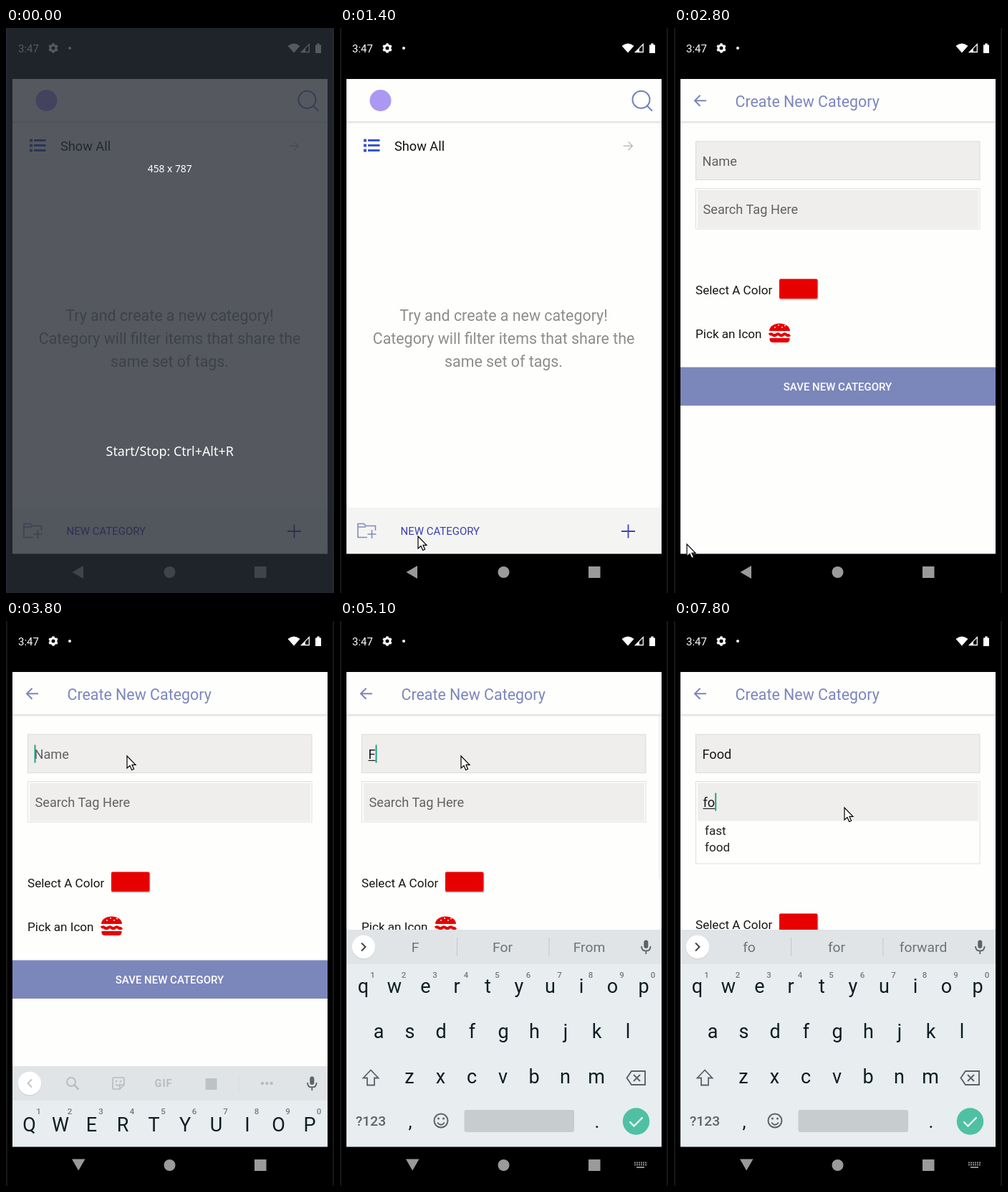
These frames come from a looping animation (458 px wide and 787 px high, 8 s). An HTML page:

```html
<!DOCTYPE html>
<html lang="en">
<head>
<meta charset="utf-8">
<title>Create a category</title>
<style>
  html, body { margin: 0; width: 100%; height: 100%; overflow: hidden; background: #000; }
  svg { display: block; width: 458px; height: 787px; }
  text { font-family: Roboto, Arial, sans-serif; white-space: pre; }
</style>
</head>
<body>
<svg id="stage" viewBox="0 0 458 787"></svg>
<script>
const LOOP = 8000, STEP = 100, TOP = 71, HEIGHT = 661;
const WHITE = '#fefefd', BLUE = '#7b86bb', RED = '#e60000', GREY = '#5c6266', INK = '#0d1d24';

// Markup helpers
const text = (x, y, size, str, fill, attrs = '') =>
  `<text x="${x}" y="${y}" font-size="${size}" fill="${fill}" ${attrs}>${str}</text>`;
const mid = (x, y, size, str, fill, attrs = '') =>
  text(x, y, size, str, fill, `text-anchor="middle" ${attrs}`);
const rect = (x, y, w, h, fill, attrs = '') =>
  `<rect x="${x}" y="${y}" width="${w}" height="${h}" fill="${fill}" ${attrs}/>`;
const disc = (x, y, r, fill, attrs = '') =>
  `<circle cx="${x}" cy="${y}" r="${r}" fill="${fill}" ${attrs}/>`;
const line = (d, stroke, width = 2, attrs = '') =>
  `<path d="${d}" fill="none" stroke="${stroke}" stroke-width="${width}" ${attrs}/>`;
const shape = (d, fill, attrs = '') => `<path d="${d}" fill="${fill}" ${attrs}/>`;
const group = (id, body, attrs = '') => `<g id="${id}" ${attrs}>${body}</g>`;
const repeat = (n, fn) => Array.from({ length: n }, (_, i) => fn(i)).join('');

const header = rect(9, TOP, 440, 60, WHITE) +
  rect(9, 130, 440, 1.5, '#dedede') + rect(9, 131.5, 440, 1.5, '#efefef');

const statusBar = text(17, 34, 15, '3:47', '#fff') +
  disc(66, 28, 4, 'none', 'stroke="#fff" stroke-width="3"') +
  repeat(6, i => rect(64.4, 21.3, 3.2, 3.4, '#fff', `transform="rotate(${i * 60} 66 28)"`)) +
  disc(89, 28, 2, '#fff') +
  shape('M393.5 25Q402 18 410.5 25L402 34.5Z', '#fff') +
  line('M423.3 22.5V33.5H412.5Z', '#fff', 1.3) + shape('M418 28V34H411.5Z', '#fff') +
  shape('M432 23.5h2.3v-2h3.4v2h2.3v11.5h-8z', '#fff');

const navBar = rect(0, 732.5, 458, 55, '#000') +
  rect(0, 0, 2, 787, '#171717') + rect(456, 0, 2, 787, '#171717') +
  disc(228.5, 758, 8, '#9a9a9a') + rect(347, 750, 16.5, 16, '#9a9a9a') +
  shape('M92.5 758L108 749V767Z', '#9a9a9a', 'id="navBack"') +
  shape('M92 749.5H110.5L101.2 765.5Z', '#9a9a9a', 'id="navDown"') +
  group('navKeys', repeat(12, i => rect(411 + i % 6 * 3, 753.5 + (i / 6 | 0) * 3, 2, 2, '#8c8c8c')) +
    rect(414, 760, 11, 2, '#8c8c8c'));

const home = rect(9, TOP, 440, HEIGHT + 20, WHITE) + header +
  disc(56.5, 101, 15, '#ab98f3') +
  disc(420.5, 99.8, 12, 'none', 'stroke="#6f7fba" stroke-width="2"') +
  line('M429 108.5L436 115.5', '#6f7fba') +
  repeat(3, i => rect(33, 154.6 + 7 * i, 4, 4, '#3a55cf') + rect(39, 155 + 7 * i, 16.5, 3, '#3a55cf')) +
  text(76, 170.5, 18.2, 'Show All', '#111') +
  line('M395.5 164.3H408M402.5 158.3L408.3 164.3L402.5 170.3', '#bdbdbd', 1.5) +
  ['Try and create a new category!', 'Category will filter items that share the', 'same set of tags.']
    .map((s, i) => mid(228.5, 408 + 32.2 * i, 21.4, s, '#8d8d8b')).join('') +
  rect(9, 668, 440, 85, '#f4f4f3') +
  line('M38 709.5H25V690.5H33.5L36 693.5H49.5V700M25 695H36M38.5 705H50.5M44.5 699V711', '#7f8cc0', 1.6) +
  text(84.5, 706.4, 14.97, 'NEW CATEGORY', '#3b3fae') +
  line('M393 701H412M402.5 691.5V710.5', '#3f46ad', 1.8);

const burger = shape('M133 422C133.500 408 161.500 408 162 422Z', RED) +
  [[141, 417], [146, 414], [151, 417], [155, 414.500]].map(p => disc(...p, 0.9, '#fff')).join('') +
  line('M133 427.300q2.400 -2 4.800 0t4.800 0t4.800 0t4.800 0t4.800 0t4.800 0', RED, 4) +
  shape('M133.500 432H161.500V434Q161 438 157 438H138Q134 438 133.500 434Z', RED);

const form = rect(9, TOP, 440, HEIGHT + 40, WHITE) + header +
  line('M45 101.300H29.500M36.500 93.800L29 101.300L36.500 108.800', BLUE, 2) +
  text(85.500, 109.700, 21.4, 'Create New Category', BLUE) +
  rect(30.5, 158, 396.5, 53.5, '#efeeed', 'stroke="#dcdcdc"') +
  text(39.5, 192, 18.2, 'Name', '#626262', 'id="nameText"') +
  rect(30.5, 223.5, 396.5, 56.5, WHITE, 'stroke="#dedede" id="tagBox"') +
  rect(33, 225.500, 392, 53, '#efeeed') +
  text(40.5, 259, 18.2, 'Search Tag Here', '#626262', 'id="tagText"') +
  group('matches', text(43, 298, 17.1, 'fast', '#222') + text(43, 321, 17.1, 'food', '#222')) +
  rect(0, 0, 0, 1.2, '#222', 'id="underline"') +
  rect(0, 0, 2, 25, '#1fa387', 'id="caret"') +
  group('lower', text(30, 370.500, 17.1, 'Select A Color', '#161616') +
    rect(147, 351, 54.5, 28, '#cfcfcf', 'rx="2"') + rect(147, 349.5, 53.5, 27.5, RED, 'rx="2"') +
    text(30, 431.500, 17.1, 'Pick an Icon', '#161616') + burger +
    rect(9, 472.500, 440, 53.500, BLUE) +
    mid(228.5, 505, 14.97, 'SAVE NEW CATEGORY', '#fff', 'font-weight="500"')) +
  rect(444.500, 132, 4.500, 226, '#bdbdbd', 'id="scrollbar"');

const ROWS = ['QWERTYUIOP', 'ASDFGHJKL', 'ZXCVBNM'];
const keyRows = lower => ROWS.map((row, r) => [...row].map((c, i) =>
  mid([32.5, 54, 97][r] + 43.5 * i, (lower ? 518 : 520.5) + 62.8 * r, 27,
    lower ? c.toLowerCase() : c, INK)).join('')).join('');
const ARROW = 'M43 625.500L32.500 636.500H38V646.500H48V636.500H53.500Z';

const tools = line('M36 448.500L30.500 454L36 459.500', '#444', 2) +
  disc(91, 452, 6, 'none', `stroke="${GREY}" stroke-width="2"`) + line('M95.500 456.500L101.500 462.500', GREY, 2.5) +
  line('M151 446H163Q165 446 165 448V456L159 462H151Q149 462 149 460V448Q149 446 151 446ZM165 456H159V462M153 455Q156 459 159 455', GREY, 1.7) +
  disc(154, 451, 1.3, GREY) + disc(160, 451, 1.3, GREY) +
  text(207.5, 459, 14.5, 'GIF', GREY, 'font-weight="700" letter-spacing="1"') +
  rect(278.500, 447, 16, 16, '#70767a') + rect(324.500, 443, 1, 23, '#c3c8cb') +
  repeat(3, i => disc(358 + 6.3 * i, 454, 2.2, GREY));

const words = line('M30 448.500L35.500 454L30 459.500', '#444', 2) +
  repeat(3, i => mid([105, 227, 348][i], 461, 19.25, '', '#6d7377', `id="word${i}"`)) +
  rect(163, 441, 1, 26, '#c3c8cb') + rect(291.500, 441, 1, 26, '#c3c8cb');

const keyboard = rect(9, 430, 440, 303, '#e8edef') + rect(9, 430, 440, 48, '#e0e4e6') +
  disc(33, 455, 16.5, '#cdd1d3') + disc(33, 454, 16.2, '#fff') +
  group('tools', tools) + group('words', words) +
  rect(424.300, 444.500, 6, 11.500, GREY, 'rx="3"') +
  line('M421 453Q421 459.500 427.300 459.500T433.600 453M427.300 459V464', GREY, 1.8) +
  repeat(10, i => mid(45.5 + 43.5 * i, 497, 11.5, (i + 1) % 10, '#747b7f', 'font-weight="500"')) +
  group('upperKeys', keyRows(false) + shape(ARROW, GREY)) +
  group('lowerKeys', keyRows(true) + line(ARROW, GREY, 1.8)) +
  line('M407 627H426V646H407L400.500 636.500ZM410 632L419 641M419 632L410 641', GREY, 1.9) +
  text(22, 703, 19.2, '?123', GREY, 'font-weight="500"') +
  mid(98, 706, 26, ',', INK) + mid(359, 706, 26, '.', INK) +
  disc(141, 696, 9.5, 'none', `stroke="${GREY}" stroke-width="2"`) +
  disc(137.5, 693, 1.5, GREY) + disc(144.5, 693, 1.5, GREY) + line('M136 698.500Q141 705 146 698.500', GREY, 1.8) +
  rect(173.5, 681, 153.5, 31, '#c8cccf', 'rx="3"') +
  disc(413.5, 697, 18.7, '#50c0a4') + line('M404.500 697.500L410.500 703.500L422.500 691.500', '#fff', 2.2);

const hint = (y, size, str) =>
  mid(228.7, y, size, str, '#fff', `style="font-family:'Noto Sans','Open Sans',sans-serif"`);

const stage = document.getElementById('stage');
stage.innerHTML = `<defs>
  <clipPath id="screen">${rect(9, TOP, 440, HEIGHT + 0.5, '#000')}</clipPath>
  <clipPath id="reveal">${rect(9, TOP, 440, HEIGHT + 1, '#000', 'id="revealBox"')}</clipPath></defs>` +
  rect(0, 0, 458, 787, '#000') + statusBar +
  group('app', group('home', home) + rect(9, TOP, 440, HEIGHT + 1, '#000', 'id="shade"') +
    group('reveal-layer', group('form', form), 'clip-path="url(#reveal)"') +
    rect(9, 0, 440, 1, '#cfcfcf', 'id="edge"') + group('keyboard', keyboard), 'clip-path="url(#screen)"') +
  navBar +
  shape('M0 0V17L4 13.500L6.700 19.500L9.600 18.200L7 12.300H12Z', '#fff',
    'id="mouse" stroke="#000" stroke-width="1.2"') +
  group('intro', rect(0, 0, 458, 787, '#282d36', 'opacity=".79"') +
    hint(201, 13.8, '458 x 787') + hint(596, 17.9, 'Start/Stop: Ctrl+Alt+R'));

const el = {};
stage.querySelectorAll('[id]').forEach(n => el[n.id] = n);
const set = (id, attrs) => { for (const k in attrs) el[id].setAttribute(k, attrs[k]); };
const show = (id, on) => set(id, { opacity: +on });
const moveTo = (id, x, y) => set(id, { transform: `translate(${x} ${y})` });

// Step tables: [start, value]
const at = (table, t) => table.reduce((v, s) => t >= s[0] ? s[1] : v, table[0][1]);
const REVEAL = [[0, 0], [2400, 0.126], [2500, 0.765], [2600, 0.96], [2700, 0.995], [2800, 1]];
const RISE = [[0, 310], [3800, 190], [3900, 50], [4000, 0]];
const ICONS = [[0, 0.3], [4100, 0.7], [4200, 1]];
const SCROLL = [[0, 0], [3900, 0.5], [4100, 0.3], [4200, 0.12], [5800, 0]];
const NAME = [[0, ''], [5000, 'F'], [5800, 'Fo'], [6000, 'Foo'], [6100, 'Food']];
const TAG = [[0, ''], [7700, 'f'], [7800, 'fo']];
const WORDS = [[0, ''], [5100, 'F For From'], [5900, 'Fo For Food'], [6100, 'Food Good Foods'],
  [7200, ''], [7700, 'f for from'], [7800, 'fo for forward']];
const MOUSE = [[1200, 40, 730], [1300, 76, 722], [1400, 109, 708], [1500, 109, 708], [1700, 118, 695],
  [2400, 118, 695], [2800, 18, 719], [2900, 12, 718], [3100, 12, 718], [3700, 169, 188],
  [6500, 169, 188], [6600, 186, 206], [6900, 238, 260], [LOOP, 238, 260]];

function mouseAt(t) {
  const i = Math.max(1, MOUSE.findIndex(m => m[0] > t));
  const [a, b] = [MOUSE[i - 1], MOUSE[i]];
  const k = (t - a[0]) / (b[0] - a[0]);
  return [a[1] + (b[1] - a[1]) * k, a[2] + (b[2] - a[2]) * k];
}

function fill(id, value, placeholder) {
  el[id].textContent = value || placeholder;
  set(id, { fill: value ? '#181818' : '#626262' });
  return value ? el[id].getComputedTextLength() : 0;
}

function render(t) {
  show('intro', t < 200);
  show('mouse', t >= 1200);
  moveTo('mouse', ...mouseAt(Math.max(t, 1200)));

  // The form is uncovered from the bottom while the home screen drifts up.
  const p = at(REVEAL, t), gap = HEIGHT * (1 - p);
  moveTo('home', 0, -0.02 * HEIGHT * p);
  show('shade', 0);
  set('shade', { opacity: 0.1 * Math.min(1, p / 0.36) });
  set('revealBox', { y: TOP + gap });
  moveTo('form', 0, 0.041 * gap);
  set('edge', { y: TOP + gap - 0.5, opacity: p > 0 && p < 0.99 ? 1 : 0 });

  const nameWidth = fill('nameText', at(NAME, t), 'Name');
  const tagWidth = fill('tagText', at(TAG, t), 'Search Tag Here');
  const inTag = t >= 7000, open = t >= 7700;
  const x = inTag ? 40.5 : 39.5, y = inTag ? 239.5 : 172.5, w = inTag ? tagWidth : nameWidth;
  set('caret', { x: x + w, y, opacity: t >= 3700 && !(t >= 4500 && t < 4700) ? 1 : 0 });
  set('underline', { x, y: y + 21.300, width: w });
  show('matches', open);
  set('tagBox', { height: open ? 114.5 : 56.5 });
  moveTo('lower', 0, open ? 58 : 0);
  set('scrollbar', { opacity: at(SCROLL, t) });

  const list = at(WORDS, t), small = t >= 5000 && t < 7200 || open;
  show('keyboard', t >= 3800);
  moveTo('keyboard', 0, at(RISE, t));
  set('tools', { opacity: list ? 0 : at(ICONS, t) });
  show('words', list !== '');
  list.split(' ').forEach((s, i) => el['word' + i].textContent = s);
  show('lowerKeys', small);
  show('upperKeys', !small);
  show('navBack', t < 3800);
  show('navDown', t >= 3800);
  set('navKeys', { opacity: t < 4000 ? 0 : at(ICONS, t) });
}

const start = performance.now();
function tick() {
  const t = (performance.now() - start) % LOOP;
  render(Math.floor(t / STEP) * STEP);
  requestAnimationFrame(tick);
}
tick();
</script>
</body>
</html>
```
